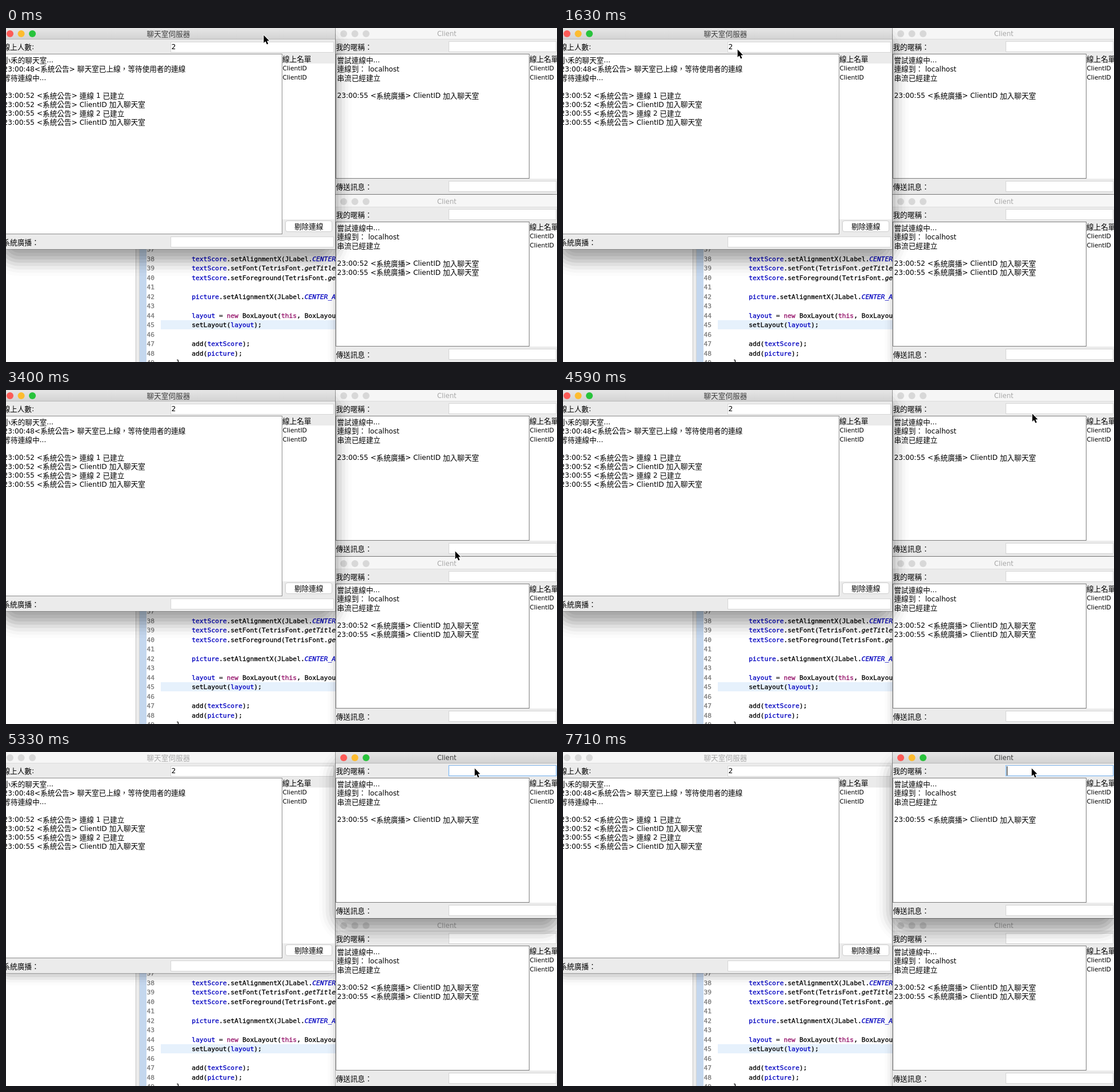
Write an HTML page with a canvas that moves like this. It is 961 px wide and 583 px high and loops after 8000 ms.

```html
<!DOCTYPE html>
<html lang="zh-Hant">
<head>
<meta charset="utf-8">
<title>聊天室</title>
<style>
html, body { margin: 0; width: 100%; height: 100%; overflow: hidden; background: #fff; }
canvas { display: block; width: 961px; height: 583px; }
</style>
</head>
<body>
<canvas id="stage" width="961" height="583"></canvas>
<script>
const ctx = document.getElementById('stage').getContext('2d');
const LOOP = 8000, TICK = 148.1;
const LATIN = '"DejaVu Sans", sans-serif';
const CJK = '"Noto Sans CJK TC", "Noto Sans CJK", sans-serif';
const MONO = '"DejaVu Sans Mono", monospace';
const LINE = 15.5;

// Pointer way points: tick, x, y
const PATH = [
  [0, 449, 12], [2, 340, 58], [4, 230, 75], [5, 208, 66], [6, 222, 40], [8, 285, 12],
  [9, 272, 8], [10, 264, 30], [11, 304, 37], [12, 334, 26], [13, 300, 9], [14, 270, 22],
  [15, 290, 40], [16, 305, 43], [18, 531, 159], [19, 594, 176], [23, 783, 281],
  [25, 783, 281], [27, 789, 233], [30, 818, 41], [33, 818, 41], [36, 817, 28], [99, 817, 28]
];

function rect(x, y, w, h, fill) {
  ctx.fillStyle = fill;
  ctx.fillRect(x, y, w, h);
}

function frame(x, y, w, h, fill, line) {
  rect(x, y, w, h, line);
  rect(x + 1, y + 1, w - 2, h - 2, fill);
}

function circle(x, y, r) {
  ctx.beginPath();
  ctx.arc(x, y, r, 0, 7);
}

// Mixed Latin and Chinese text, y is the middle of the line
function text(str, x, y, color = '#000', size = 12.1) {
  ctx.fillStyle = color;
  for (const run of str.match(/[\u2e80-\uffef]+|[^\u2e80-\uffef]+/g)) {
    const wide = run.charCodeAt(0) >= 0x2e80;
    ctx.font = wide ? '12.6px ' + CJK : size + 'px ' + LATIN;
    ctx.fillText(run, x, y + (wide ? 4.7 : 4.4));
    x += ctx.measureText(run).width;
  }
  return x;
}

// Monospaced code with a slightly heavy stroke
function codeText(str, x, y, color, style = '') {
  ctx.font = style + ' 11.27px ' + MONO;
  ctx.fillStyle = ctx.strokeStyle = color;
  ctx.lineWidth = 0.3;
  ctx.fillText(str, x, y);
  ctx.strokeText(str, x, y);
  return x + ctx.measureText(str).width;
}

function log(lines, x, y) {
  lines.forEach((line, i) => line && text(line, x, y + i * LINE));
}

// Soft shadow in visible bands
function shadow(x, y, w, h, active) {
  const [reach, drop, strength, steps] = active ? [29, 18, 0.5, 10] : [14, 7, 0.26, 6];
  for (let i = 0; i < steps; i++) {
    const u = 1 - 2 * i / steps, grow = u * reach;
    ctx.fillStyle = `rgba(0,0,0,${Math.exp(-u * u * 1.8) * strength * 1.5 / steps})`;
    ctx.beginPath();
    ctx.roundRect(x - grow, y + drop - grow, w + 2 * grow, h + 2 * grow, reach + grow + 2);
    ctx.fill();
  }
}

function chrome(x, y, w, h, active, lightX) {
  shadow(x, y, w, h, active);
  rect(x - 1, y - 1, w + 2, h + 2, 'rgba(0,0,0,0.22)');
  rect(x, y, w, h, '#ebebeb');
  const bar = ctx.createLinearGradient(0, y, 0, y + 22);
  bar.addColorStop(0, active ? '#e8e8e8' : '#f6f6f6');
  bar.addColorStop(1, active ? '#d2d2d2' : '#f6f6f6');
  rect(x, y, w, 22, bar);
  rect(x, y + 21, w, 1, active ? '#b8b8b8' : '#dcdcdc');
  const lights = active ? ['#fc5b57', '#fdbc2f', '#28c33c'] : Array(3).fill('#d8d8d8');
  lights.forEach((color, i) => {
    circle(lightX + i * 19.5, y + 12, 6);
    ctx.fillStyle = color;
    ctx.fill();
  });
}

function field(x, y, w) {
  frame(x, y, w, 19, '#fff', '#d6d6d6');
}

function users(x, y, w, h) {
  text('線上名單', x, y + 54);
  rect(x, y + 62, w, h, '#fff');
  text('ClientID', x + .5, y + 70, '#000', 10.7);
  text('ClientID', x + .5, y + 86, '#000', 10.7);
}

function editor() {
  rect(226, 380, 1, 203, '#c4c4c4');
  rect(227, 380, 6, 203, '#ececec');
  rect(232, 380, 1, 203, '#d4d4d4');
  rect(233, 380, 12, 203, '#c4d7ee');
  rect(270, 510, 310, 16, '#e6f1fc');
  const ink = { k: '#000', b: '#0000c0', p: '#930f68', i: '#000', c: '#0000c0' };
  const code = {
    38: 'b:textScore|k:.setAlignmentX(JLabel.|c:CENTER_A',
    39: 'b:textScore|k:.setFont(TetrisFont.|i:getTitle',
    40: 'b:textScore|k:.setForeground(TetrisFont.|i:get',
    42: 'b:picture|k:.setAlignmentX(JLabel.|c:CENTER_A',
    44: 'b:layout|k: = |p:new|k: BoxLayout(|p:this|k:, BoxLayout',
    45: 'k:setLayout(|b:layout|k:);',
    47: 'k:add(|b:textScore|k:);',
    48: 'k:add(|b:picture|k:);'
  };
  for (let n = 37; n < 50; n++) {
    const y = 406.5 + (n - 38) * 16.5;
    codeText(n, 245.5, y, '#787878');
    let x = 324;
    for (const part of (code[n] || '').split('|').filter(Boolean)) {
      const kind = part[0];
      x = codeText(part.slice(2), x, y, ink[kind], 'ic'.includes(kind) ? 'italic' : '');
    }
  }
  codeText('}', 297, 586.5, '#000');
}

function server(active) {
  chrome(-8, -2, 582, 388, active, 7);
  text('聊天室伺服器', 245.5, 10, active ? '#3c3c3c' : '#a8a8a8');
  text('線上人數:', -5.5, 33);
  field(287, 24, 285);
  text('2', 288.5, 33);
  frame(-8, 45, 490, 315, '#fff', '#8c8c8c');
  log(['小禾的聊天室...', '23:00:48<系統公告> 聊天室已上線，等待使用者的連線', '等待連線中...', '',
    '23:00:52 <系統公告> 連線 1 已建立', '23:00:52 <系統公告> ClientID 加入聊天室',
    '23:00:55 <系統公告> 連線 2 已建立', '23:00:55 <系統公告> ClientID 加入聊天室'], -4.5, 56);
  users(482, 0, 91, 272);
  ctx.beginPath();
  ctx.roundRect(487.5, 336.5, 81, 19, 3.5);
  ctx.fillStyle = '#fff';
  ctx.fill();
  ctx.lineWidth = 1;
  ctx.strokeStyle = '#cdcdcd';
  ctx.stroke();
  text('剔除連線', 503, 346);
  text('系統廣播：', -5.5, 374);
  field(287, 364, 285);
}

function client(y, active, lines) {
  chrome(575, y - 2, 388, 292, active, 589);
  text('Client', 752, y + 10, active ? '#3c3c3c' : '#a8a8a8', 11.6);
  text('我的暱稱：', 575.5, y + 33);
  field(772, y + 23, 188);
  frame(575, y + 45, 338, 218, '#fff', '#7c7c7c');
  log(['嘗試連線中...', '連線到： localhost', '串流已經建立', '', ...lines], 577.5, y + 56);
  users(913, y, 48, 201);
  text('傳送訊息：', 575.5, y + 277);
  field(772, y + 267, 188);
}

function nameInput(tick) {
  if (tick < 33) return;
  frame(771, 23, 190, 20, '#b5d6f6', '#d4e6f8');
  frame(772, 23, 188, 19, '#fff', '#7fb4ea');
  const typed = tick < 48 || tick > 51 ? '' : tick === 48 || tick === 51 ? 's' : 'su';
  const end = typed ? text(typed, 775, 33) : 774;
  const caret = tick < 36 || (tick >= 39 && tick < 42) || tick >= 46;
  if (caret) rect(Math.round(end), 25, 1, 16, '#000');
}

function pointer(tick) {
  const i = PATH.findIndex(p => p[0] > tick);
  const [t0, x0, y0] = PATH[i - 1], [t1, x1, y1] = PATH[i];
  const u = (tick - t0) / (t1 - t0);
  if (tick === 32) {
    circle(820, 42, 9.8);
    ctx.lineWidth = 1.2;
    ctx.strokeStyle = '#111';
    ctx.stroke();
  }
  ctx.save();
  ctx.translate(Math.round(x0 + (x1 - x0) * u), Math.round(y0 + (y1 - y0) * u));
  ctx.beginPath();
  ctx.moveTo(0.5, 0.5);
  for (const [px, py] of [[.5, 14], [3.6, 11.2], [6, 16.5], [8.3, 15.5], [6, 10.4], [10, 10.2]]) {
    ctx.lineTo(px, py);
  }
  ctx.closePath();
  ctx.lineJoin = 'round';
  ctx.lineWidth = 2;
  ctx.strokeStyle = '#fff';
  ctx.stroke();
  ctx.fillStyle = '#000';
  ctx.fill();
  ctx.restore();
}

function draw(now) {
  const tick = Math.floor((now % LOOP + 10) / TICK);
  const switched = tick >= 32;
  const joined = '23:00:55 <系統廣播> ClientID 加入聊天室';
  const upper = () => client(0, switched, [joined]);
  const lower = () => client(293, false, ['23:00:52 <系統廣播> ClientID 加入聊天室', joined]);
  const host = () => server(!switched);
  rect(0, 0, 961, 583, '#fff');
  editor();
  for (const layer of switched ? [lower, host, upper] : [upper, lower, host]) layer();
  nameInput(tick);
  pointer(tick);
}

const start = performance.now();
function loop() {
  draw(performance.now() - start);
  requestAnimationFrame(loop);
}
loop();
</script>
</body>
</html>
```
